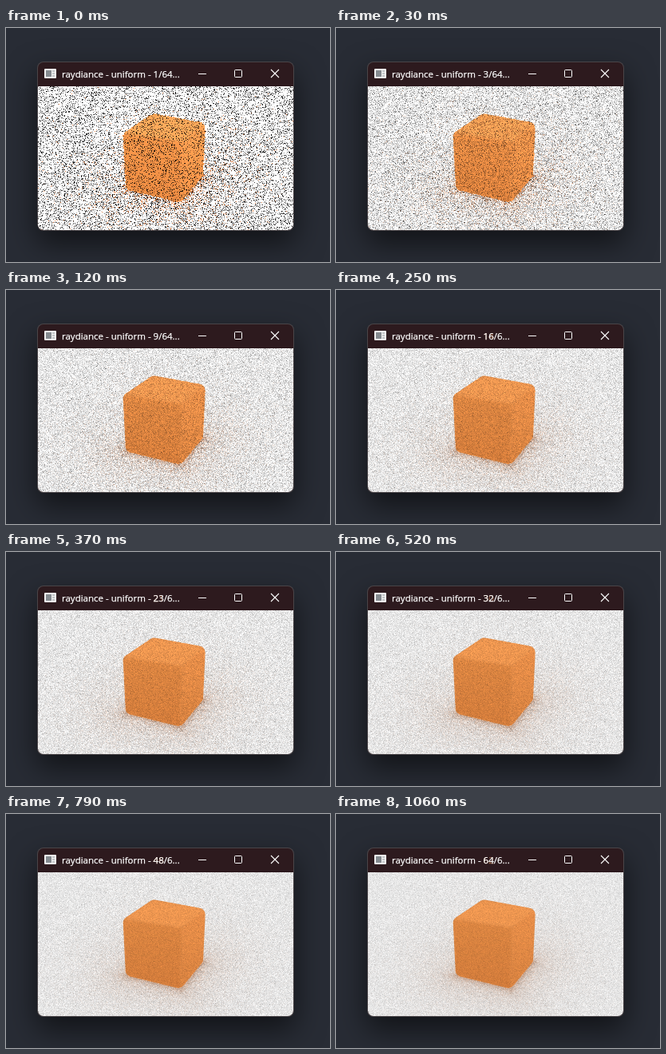
Recreate the animation shown at these times as an HTML page with a canvas. Size 406 px wide and 293 px high, loop 3060 ms.

```html
<!DOCTYPE html>
<html lang="en">
<head>
<meta charset="utf-8">
<title>raydiance</title>
<style>
  html, body { margin: 0; width: 100%; height: 100%; overflow: hidden; background: #282c35; }
  #window {
    position: absolute; left: 40px; top: 43px; width: 320px; height: 210px;
    border-radius: 7px; background: #2d1a1e;
    box-shadow: 0 0 0 1px #4a4548, 0 15px 36px 2px rgba(0, 0, 0, .56);
  }
  #view { position: absolute; left: 0; top: 30px; border-radius: 0 0 7px 7px; }
  #chrome { position: absolute; left: 0; top: 0; }
  #title {
    position: absolute; left: 30px; top: 5px; white-space: pre; color: #fff;
    font: 11.5px/20px "Open Sans", "Noto Sans", sans-serif;
    -webkit-text-stroke: .25px;
  }
  #count { position: relative; display: inline-block; z-index: 0; }
  #count::before {
    content: attr(data-past); position: absolute; left: 0; top: 0;
    color: #d08d62; opacity: .6; z-index: -1;
  }
</style>
</head>
<body>
<div id="window">
  <svg id="chrome" width="320" height="30" fill="none" stroke="#fff">
    <g stroke="none">
      <rect x="8" y="8" width="15" height="12" rx="1" fill="#f1f1f1"/>
      <rect x="10" y="10" width="7" height="8" fill="#858b90"/>
      <path d="M18 10h3v2h-3zM18 13h3v2h-3zM18 16h3v2h-3z" fill="#c3c6c8"/>
    </g>
    <path d="M201 14.5h10"/>
    <rect x="246.5" y="9.5" width="9" height="9" rx="1"/>
    <path d="M292 9l10 10M302 9l-10 10" stroke-width="1.1"/>
  </svg>
  <div id="title">raydiance - uniform - <span id="count"></span><span id="total"></span></div>
  <canvas id="view" width="320" height="180"></canvas>
</div>
<script>
const W = 320, H = 180, LOOP = 3060, LAST = 35;
const byId = id => document.getElementById(id);
const view = byId('view').getContext('2d');

// Corners of the cube in view coordinates.
const back = [144, 34], right = [210, 46], rightLow = [207, 112], frontLow = [179, 146],
      leftLow = [110, 129], left = [106.5, 59], front = [181, 70];

function paintCube() {
  const canvas = document.createElement('canvas');
  canvas.width = W;
  canvas.height = H;
  const ctx = canvas.getContext('2d');
  const outline = [back, right, rightLow, frontLow, leftLow, left];
  ctx.beginPath();
  ctx.moveTo((left[0] + back[0]) / 2, (left[1] + back[1]) / 2);
  outline.forEach((p, i) => ctx.arcTo(...p, ...outline[(i + 1) % 6], 8));
  ctx.closePath();
  ctx.fillStyle = '#de8a47';
  ctx.fill();
  ctx.globalCompositeOperation = 'source-atop';
  ctx.filter = 'blur(1.5px)';
  const face = (top, bottom, ...points) => {
    const shade = ctx.createLinearGradient(0, 45, 0, 147);
    shade.addColorStop(0, top);
    shade.addColorStop(1, bottom);
    ctx.fillStyle = shade;
    ctx.beginPath();
    points.forEach(p => ctx.lineTo(...p));
    ctx.fill();
  };
  face('#ed9650', '#e68f4a', back, right, front, left);
  face('#dc8743', '#d07a3a', left, front, frontLow, leftLow);
  face('#e88f4a', '#d7813f', front, right, rightLow, frontLow);
  return ctx.getImageData(0, 0, W, H).data;
}

function segmentDistance(x, y, [ax, ay], [bx, by]) {
  const dx = bx - ax, dy = by - ay;
  const k = Math.max(0, Math.min(1, ((x - ax) * dx + (y - ay) * dy) / (dx * dx + dy * dy)));
  return Math.hypot(x - ax - k * dx, (y - ay - k * dy) * 1.3);
}

// Chance that a ray from the floor meets the cube.
const cube = paintCube();
const base = [[148, 102], leftLow, frontLow, rightLow, [148, 102]];
const bounce = Float32Array.from({ length: W * H }, (_, i) => {
  const x = i % W, y = Math.floor(i / W);
  const d = Math.min(...base.slice(1).map((p, j) => segmentDistance(x, y, base[j], p)));
  return 0.28 * Math.exp(-d / 5) + 0.2 * Math.exp(-d / 38);
});

let seed = 20117;
function random() {
  seed = (seed + 0x6D2B79F5) | 0;
  let t = Math.imul(seed ^ (seed >>> 15), 1 | seed);
  t = (t + Math.imul(t ^ (t >>> 7), 61 | t)) ^ t;
  return ((t ^ (t >>> 14)) >>> 0) / 4294967296;
}

const sum = new Float32Array(W * H * 3);
function add(i, r, g, b, light) {
  sum[i * 3] += r * light;
  sum[i * 3 + 1] += g * light;
  sum[i * 3 + 2] += b * light;
}

function addSample() {
  for (let i = 0; i < W * H; i++) {
    const c = i * 4, u = random();
    if (cube[c + 3] > 255 * random()) {
      add(i, cube[c], cube[c + 1], cube[c + 2], Math.min(1.15, 4.5 * u));
    } else if (random() < bounce[i]) {
      add(i, 236, 142, 84, Math.min(1, 5 * u * random()));
    } else {
      add(i, 255, 255, 255, Math.min(1.07, 3.4 * u));
    }
  }
}

const samplesAt = step => Math.floor(step * 16 / 9 + 1.9);
const renders = [];
let taken = 0;
function render(step) {
  while (renders.length <= step) {
    const count = samplesAt(renders.length);
    for (; taken < count; taken++) addSample();
    const image = new ImageData(W, H);
    for (let i = 0; i < W * H; i++) {
      for (let k = 0; k < 3; k++) image.data[i * 4 + k] = sum[i * 3 + k] / count;
      image.data[i * 4 + 3] = 255;
    }
    renders.push(image);
  }
  return renders[step];
}

function stepAt(t) {
  return t < 250 ? Math.min(7, Math.floor(t / 30)) : Math.min(LAST, 8 + Math.floor((t - 250) / 30));
}

let shown = -1;
function draw(now) {
  const step = stepAt(Math.max(0, now - start) % LOOP);
  if (step !== shown) {
    shown = step;
    const count = samplesAt(step);
    view.putImageData(render(step), 0, 0);
    byId('count').textContent = count;
    byId('count').dataset.past = count > 11 ? samplesAt(step - 1) : '';
    byId('total').textContent = count < 10 ? '/64...' : '/6...';
  }
  requestAnimationFrame(draw);
}

const start = performance.now();
draw(start);
</script>
</body>
</html>
```
